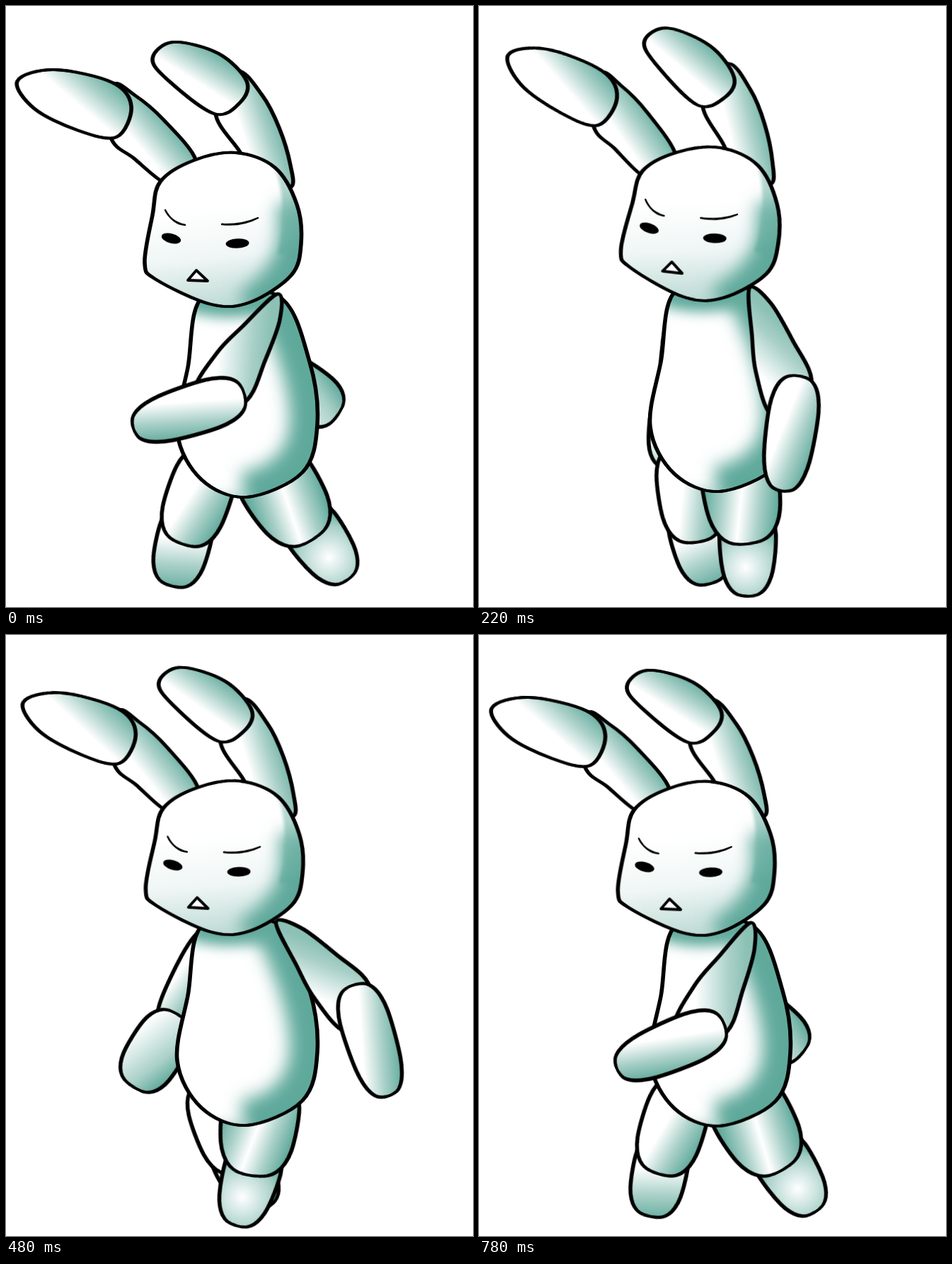
Animation of 660x848 px, one loop 0.8 s. Source, as an HTML page:

```html
<!DOCTYPE html>
<html lang="en">
<head>
<meta charset="utf-8">
<title>Walking rabbit</title>
<style>
  html, body { margin: 0; width: 100%; height: 100%; overflow: hidden; background: #fff; }
  svg { display: block; width: 660px; height: 848px; }
  .ink { fill: none; stroke: #000; stroke-width: 3.8; stroke-linecap: round; stroke-linejoin: round; }
  .brow { stroke: #000; stroke-width: 2.4; stroke-linejoin: round; }
</style>
</head>
<body>
<svg id="stage" viewBox="0 0 660 848"></svg>
<script>
const LOOP = 800;
const WHITE = '#fff', PALE = '#d4e8e4', SOFT = '#a9d0c8', TEAL = '#5fa99b';
const defs = [], bones = [];
const newId = () => 'n' + (defs.length + bones.length);

const points = s => s.split(' ').map(p => p.split(',').map(Number));

// Closed smooth curve through the points (Catmull-Rom as Béziers)
function curve(p) {
  const n = p.length, at = i => p[(i + n) % n];
  let d = 'M' + p[0];
  for (let i = 0; i < n; i++) {
    const [a, b, c, e] = [-1, 0, 1, 2].map(k => at(i + k));
    const h1 = b.map((v, k) => (v + (c[k] - a[k]) / 6).toFixed(1));
    const h2 = c.map((v, k) => (v - (e[k] - b[k]) / 6).toFixed(1));
    d += `C${h1} ${h2} ${c}`;
  }
  return d + 'Z';
}

// Rounded limb segment: a superellipse, wider at the foot when taper > 0
function pod(x, y, rx, ry, taper = 0, turn = 0) {
  const pow = v => Math.sign(v) * Math.abs(v) ** .73;
  const r = turn * Math.PI / 180, c = Math.cos(r), s = Math.sin(r);
  return Array.from({ length: 20 }, (_, i) => {
    const a = i * Math.PI / 10, v = pow(Math.sin(a));
    const px = pow(Math.cos(a)) * rx * (1 + taper * v), py = v * ry;
    return [x + px * c - py * s, y + px * s + py * c].map(k => +k.toFixed(1));
  });
}

// Evenly spaced colour stops
function paint(tag, place, colors) {
  const id = newId();
  const stops = colors.map((c, i) => `<stop offset="${i / (colors.length - 1)}" stop-color="${c}"/>`).join('');
  defs.push(`<${tag} id="${id}" gradientUnits="userSpaceOnUse" ${place}>${stops}</${tag}>`);
  return `url(#${id})`;
}
const linear = (x1, y1, x2, y2, ...colors) =>
  paint('linearGradient', `x1="${x1}" y1="${y1}" x2="${x2}" y2="${y2}"`, colors.length ? colors : [WHITE, SOFT, TEAL]);
const radial = (cx, cy, r) =>
  paint('radialGradient', `cx="${cx}" cy="${cy}" r="${r}"`, [WHITE, PALE, SOFT, TEAL]);

function softFilter(amount) {
  const id = newId();
  defs.push(`<filter id="${id}" filterUnits="userSpaceOnUse" x="100" y="150" width="450" height="620"><feGaussianBlur stdDeviation="${amount}"/></filter>`);
  return `filter="url(#${id})"`;
}
const shadow = (d, width, amount, color = TEAL) =>
  `<path d="${d}" fill="none" stroke="${color}" stroke-width="${width}" ${softFilter(amount)}/>`;

// Filled, shaded shape inked with a flat nib: upright lines come out heavier
function part(p, fill, shade = '') {
  const d = curve(p), id = newId();
  defs.push(`<clipPath id="${id}"><path d="${d}"/></clipPath>`);
  const ink = [-.9, .9].map(x => `<path class="ink" d="${d}" transform="translate(${x})"/>`).join('');
  return `<path d="${d}" fill="${fill}"/><g clip-path="url(#${id})">${shade}</g>${ink}`;
}

// Group at x,y; move(swing, bounce) gives [dx, dy, clockwise degrees]
function bone(x, y, move, inner) {
  const id = 'bone' + bones.length;
  bones.push({ id, x, y, move });
  return `<g id="${id}">${inner}</g>`;
}

// Joint angle from straight down, positive to the right
const angle = ([from, to, bend = 0], swing, bounce) => from + (to - from) * swing + bend * bounce;

function limb(x, y, len, upper, lower, upperPart, lowerPart, lowerBehind) {
  const low = bone(0, len, (s, b) => [0, 0, angle(upper, s, b) - angle(lower, s, b)], lowerPart);
  return bone(x, y, (s, b) => [0, 0, -angle(upper, s, b)], lowerBehind ? low + upperPart : upperPart + low);
}

const sway = (x, y, dx, dy, turn, inner) =>
  bone(x, y, (s, b) => [dx * b, dy * b, turn * b], `<g transform="translate(${-x} ${-y})">${inner}</g>`);

const farArm = limb(282, 418, 139, [47, -34], [62, -48],
  part(pod(0, 78, 27, 78, .4), linear(-22, 80, 32, 100)),
  part(pod(-9, 46, 39, 60, 0, 6), linear(-48, 30, 30, 70, WHITE, PALE, SOFT, TEAL)));

const farLeg = limb(290, 640, 86, [-19, 31], [-14, 40],
  part(pod(0, 55, 45, 71), linear(-12, 60, 46, 75)),
  part(pod(-3, 42, 38, 59, -.05), linear(-8, 32, 6, 108)), true);

const nearLeg = limb(375, 640, 84, [29.5, -22, 4], [38, -27],
  part(pod(-8, 55, 54, 72, -.08, -3), linear(-62, 50, 44, 70, TEAL, SOFT, WHITE, SOFT, TEAL)),
  part(pod(-4, 55, 39, 62, -.14, 2), radial(-8, 76, 66)), true);

const body = part(
  points('280,408 257,510 242,602 276,668 340,693 419,658 440,590 429,502 386,410'), WHITE,
  shadow('M386 400C430 480 450 560 440 610C430 660 385 696 335 698', 84, 12) +
  shadow('M255 706L340 706', 30, 9, SOFT) +
  shadow('M255 412C300 428 350 426 400 404', 34, 9));

const nearArm = limb(383, 408, 169, [-28.5, 63], [-71, 41, 3],
  part(points('0,-2 20,29 29,90 33,150 0,190 -39,174 -36,111 -22,62'),
    linear(-38, 105, 28, 75, WHITE, PALE, SOFT, '#8cc1b6')),
  part(pod(-1, 47, 35, 82, -.08, 2), linear(-14, 45, 40, 60)));

const leftEar =
  sway(205, 180, 15.5, -4, 6,
    part(points('150,112 182,126 222,160 268,217 250,255 221,248 182,216 148,185'), linear(196, 207, 242, 168))) +
  sway(95, 138, 22, -19.5, 10,
    part(points('16,106 68,90 150,108 177,142 156,185 100,175 40,145'), linear(110, 146, 150, 98)));

const rightEar =
  sway(350, 180, 19, -1, 5.7,
    part(points('326,92 362,126 386,172 402,225 402,256 360,250 330,205 296,150'), linear(338, 190, 398, 170))) +
  sway(272, 105, 24, -8, 9.5,
    part(points('207,74 236,51 300,67 340,106 330,137 294,152 228,104'), linear(280, 114, 310, 66)));

const eye = (x, y, rx, turn) => `<ellipse rx="${rx}" ry="6.8" transform="translate(${x} ${y}) rotate(${turn})"/>`;
const face =
  eye(233.5, 328, 14, 15) + eye(327, 335, 16.5, -3) +
  '<path class="brow" d="M225 288Q233 305 253 309Q236 308 225 288Z"/>' +
  '<path class="brow" d="M305 308Q334 309 356 299Q334 311 305 308Z"/>' +
  '<path class="ink" style="fill:#fff" d="M269 373L257 387L285 388Z"/>';

const head = sway(320, 415, 0, 0, 5,
  part(points('325,207 380,228 411,280 417,335 403,380 345,418 290,421 212,386 196,362 207,295 218,248 265,218'),
    linear(296, 285, 312, 424, WHITE, '#eff6f5', '#bddad4'),
    shadow('M412 275C424 335 414 385 345 432', 62, 12) +
    `<path d="M374 215C392 250 396 300 384 350H440V215Z" fill="${linear(0, 225, 0, 350, SOFT, '#7dbaae', TEAL)}" opacity=".7" ${softFilter(2)}/>`) +
  face);

const rabbit = bone(0, 0, (s, b) => [0, -9 * b ** 4, 0],
  farArm + farLeg + nearLeg + body + nearArm + rightEar + leftEar + head);

document.getElementById('stage').innerHTML = `<defs>${defs.join('')}</defs>${rabbit}`;

// Limbs swing there and back once a loop; the trunk bounces twice, the second time lower
const quarters = [0, 1, 2, 3, 4];
const swing = q => 1 - Math.abs(q / 2 - 1);
const bounce = q => q % 2 * (q < 2 ? 1 : .75);

for (const { id, x, y, move } of bones) {
  const frames = quarters.map(q => {
    const [dx, dy, turn] = move(swing(q), bounce(q));
    return { transform: `translate(${x + dx}px, ${y + dy}px) rotate(${turn}deg)` };
  });
  const run = document.getElementById(id).animate(frames, { duration: LOOP, iterations: Infinity });
  run.startTime = document.timeline.currentTime;
}
</script>
</body>
</html>
```
